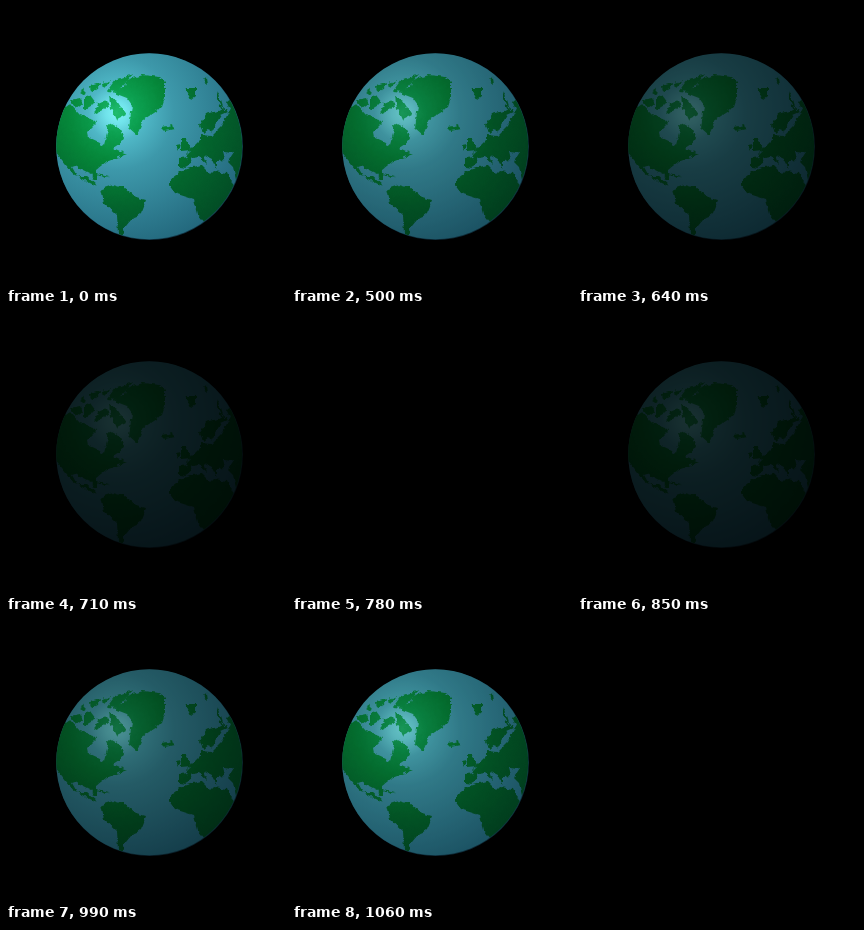
An HTML page that plays this animation: 280 by 280 pixels, repeating every 1130 ms.

```html
<!DOCTYPE html>
<html lang="en">
<head>
<meta charset="utf-8">
<title>Pulsing globe</title>
<style>
  html, body { margin: 0; width: 100%; height: 100%; overflow: hidden; background: #000; }
  svg { display: block; width: 100%; height: 100%; }
</style>
</head>
<body>
<svg viewBox="0 0 280 280">
  <defs>
    <radialGradient id="sea" gradientUnits="userSpaceOnUse" cx="111" cy="107" r="142">
      <stop offset="0" stop-color="#80f4f8"/>
      <stop offset=".08" stop-color="#70e2ea"/>
      <stop offset=".2" stop-color="#4fb7c6"/>
      <stop offset=".4" stop-color="#3d98aa"/>
      <stop offset="1" stop-color="#22667b"/>
    </radialGradient>
    <radialGradient id="land" gradientUnits="userSpaceOnUse" cx="111" cy="107" r="142">
      <stop offset="0" stop-color="#1fbd70"/>
      <stop offset=".15" stop-color="#0ca050"/>
      <stop offset=".35" stop-color="#058639"/>
      <stop offset=".65" stop-color="#03652d"/>
      <stop offset="1" stop-color="#024c25"/>
    </radialGradient>
    <clipPath id="disc"><circle cx="143.2" cy="140.3" r="93"/></clipPath>
    <!-- Ragged coastlines -->
    <filter id="coast" filterUnits="userSpaceOnUse" x="0" y="0" width="280" height="280" color-interpolation-filters="sRGB">
      <feTurbulence type="fractalNoise" baseFrequency=".2" numOctaves="2" seed="4"/>
      <feDisplacementMap in="SourceGraphic" scale="5" xChannelSelector="R" yChannelSelector="G"/>
    </filter>
  </defs>
  <g id="globe">
    <circle cx="143.7" cy="140.8" r="93.2" fill="#123748"/>
    <circle cx="143.2" cy="140.3" r="93" fill="url(#sea)"/>
    <g clip-path="url(#disc)">
      <g fill="url(#land)" filter="url(#coast)">
        <!-- North America -->
        <path d="M45 112L64 98 74 109 88 113 90 117 81 126 82 131 93 136 95 141 98 139 102 124 100 119 104 117 115 123 119 134 107 142 121 148 100 156 91 163 91 173 88 174 85 168 69 160 66 161 71 170 80 170 91 180 67 168 45 140Z"/>
        <!-- Arctic islands -->
        <path d="M64 94L74 92 77 98 70 103ZM73 86L79 82 78 89ZM78 93L84 89 90 97 78 104ZM84 80L94 77 92 83 85 86ZM97 77L106 74 98 82ZM101 85L109 74 127 68 112 86ZM92 98L101 94 103 101 88 108ZM103 90L111 95 120 109 110 114 105 103Z"/>
        <!-- Greenland -->
        <path d="M108 87L119 80 121 74 137 69 154 71 159 76 159 92 156 101 138 113 131 129 123 122 126 99 121 92Z"/>
        <!-- Islands -->
        <path d="M155 121L167 119 168 123 159 125ZM179 82L190 82 190 90 185 94ZM196 73L201 71 202 78ZM175 133L180 133 185 144 175 145ZM170 140L175 139 172 145ZM91 168L103 171 98 172Z"/>
        <!-- Europe and Asia -->
        <path d="M211 85L216 101 222 106 215 109 205 127 203 123 198 127 194 119 200 108 216 104 211 93ZM226 92L221 96 224 103 216 120 206 130 195 129 195 133 180 148 183 151 173 152 173 161 180 162 187 152 193 151 201 158 198 149 206 153 211 163 211 155 219 154 217 146 228 147 222 156 227 161 230 174 240 175 240 110Z"/>
        <!-- Africa -->
        <path d="M177 164L195 159 204 168 207 165 222 167 228 181 234 182 218 206 203 223 191 208 187 193 168 187 163 180 166 172Z"/>
        <!-- South America -->
        <path d="M95 183L107 179 118 182 129 191 140 194 135 207 125 214 117 224 118 230 112 228 111 209 98 197Z"/>
      </g>
    </g>
  </g>
</svg>
<script>
  const globe = document.getElementById("globe");
  const HOLD = 500, STEP = 70, LOOP = 1130;

  // Full light, then five equal steps down to black and four back up.
  function light(t) {
    if (t < HOLD) return 1;
    const step = Math.floor((t - HOLD) / STEP) + 1;
    return Math.abs(5 - step) / 5;
  }

  function draw() {
    globe.setAttribute("opacity", light(performance.now() % LOOP));
    requestAnimationFrame(draw);
  }
  draw();
</script>
</body>
</html>
```
